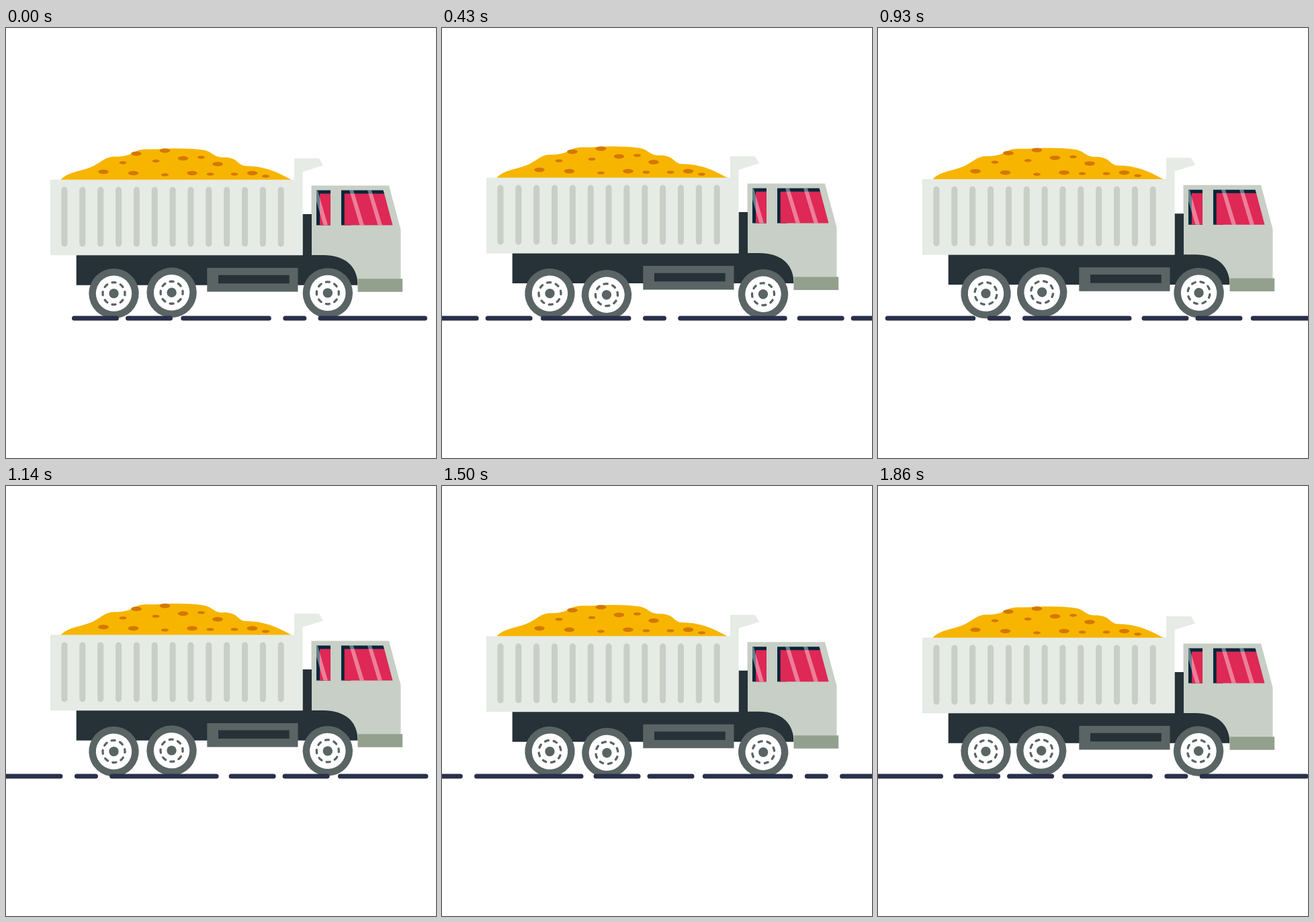
Write an HTML page that moves like this. It is 640 px wide and 640 px high and loops after 1.93 s.

```html
<!DOCTYPE html>
<html lang="en">
<head>
<meta charset="utf-8">
<title>Dump truck</title>
<style>
  html, body { margin: 0; width: 100%; height: 100%; overflow: hidden; background: #fff; }
  svg { display: block; width: 100%; height: 100%; }
</style>
</head>
<body>
<svg viewBox="0 0 640 640">
  <g id="truck">
    <path fill="#f7b500" d="M81.5 226C92 213.500 112 214 130 205.500C145 197.500 148 191.500 163 191.500C182 191.500 188 186 197 182C205 179.500 215 181 228 180.200C250 178.500 275 179 293 181.500C307 183.500 308 191.500 321 192.500C345 191.500 343 202.500 355 205.200C385 205.500 402 213.500 425 226z"/>
    <g id="stones" fill="#d47800"></g>
    <path fill="#c8cfc6" d="M454.500 234.500H570L587.500 300V375H454.500z"/>
    <path fill="#263138" d="M441.500 277H455V338H472C504 338 523.500 354 523.500 382.800H104.700V338H441.500z"/>
    <path fill="#e6ebe5" d="M66 225.700H429V194H466L472 204.500L441.500 214V338.300H66z"/>
    <path id="slots" stroke="#c8cfc6" stroke-width="9" stroke-linecap="round"/>
    <path fill="#93a08e" d="M523.500 373.300h66.700v19.500h-66.700z"/>
    <path fill="#5a6465" d="M299.300 357h135.200v35.500H299.300z"/>
    <path fill="#263138" d="M316 367.700h105.700v12.500H316z"/>
    <path fill="#00263a" d="M462 241.500h21v52h-21zM499 241.500h62.500l1.500 5l-50 47h-14z"/>
    <path fill="#de2855" d="M467 246.500h16v47h-16zM503.700 246.500H563L575.500 293.500H503.700z"/>
    <path fill="#fff" fill-opacity=".4" d="M462 242h2l15 51.500h-6.500L462 258zM511 241.500h6l16 52h-6.500zM538 241.500h6l16 52h-6.500z"/>
  </g>
  <g id="wheels"></g>
  <path id="road" d="M101.500 432h1400" stroke="#2a2f4a" stroke-width="7" stroke-linecap="round"
    stroke-dasharray="63 17 63 19.300 127.500 24.500 28 24.200 155.500 22"/>
</svg>
<script>
const LOOP = 1930, STEPS = 27;
const $ = id => document.getElementById(id);

const stones = (spots, rx, ry) => spots.map(([x, y]) =>
  `<ellipse cx="${x}" cy="${y}" rx="${rx}" ry="${ry}"/>`).join('');
$('stones').innerHTML =
  stones([[145, 214], [194, 187], [189.5, 216], [236.5, 182.5], [263.5, 194], [277, 216], [315, 202.5], [366.5, 216]], 7.8, 3.3) +
  stones([[174, 200.5], [223, 198], [236.5, 218.5], [290.5, 192.5], [304, 217.5], [340, 217.5], [386.5, 220.5]], 5.5, 2.2);

$('slots').setAttribute('d', Array.from({ length: 13 }, (_, i) => `M${87 + 26.85 * i} 241v80`).join(''));

const wheels = [{ x: 160.5, wobble: 0 }, { x: 245, wobble: 2.1 }, { x: 478, wobble: 1.1 }];
$('wheels').innerHTML = wheels.map(() => `<g>
  <circle r="37.2" fill="#5a6465"/><circle r="26.7" fill="#fff"/><circle r="7.2" fill="#5a6465"/>
  <circle r="16.5" fill="none" stroke="#5a6465" stroke-width="3.3" stroke-linecap="round"
    pathLength="80" stroke-dasharray="4 6" stroke-dashoffset="2"/></g>`).join('');

const move = (el, x, y, turn = 0) => el.setAttribute('transform', `translate(${x} ${y}) rotate(${turn})`);

function draw(time) {
  // source-style stepping: 14 poses per second
  const n = Math.min(STEPS - 1, Math.floor((time % LOOP + 5) * STEPS / LOOP));
  const travel = 18.8 * n + 0.00234 * n ** 3;
  const turn = 1.15 * travel;
  const angle = (turn - 40) * Math.PI / 180;
  const bounce = 2.1 * (Math.cos(2 * Math.PI * (travel / 88.3 + .03)) - 1);

  move($('truck'), 0, bounce);
  move($('road'), -travel, 0);
  wheels.forEach(({ x, wobble }, i) => move($('wheels').children[i],
    x + wobble * Math.cos(angle), 395.1 + wobble * Math.sin(angle), turn));
}

const start = performance.now();
function tick() {
  draw(performance.now() - start);
  requestAnimationFrame(tick);
}
tick();
</script>
</body>
</html>
```
